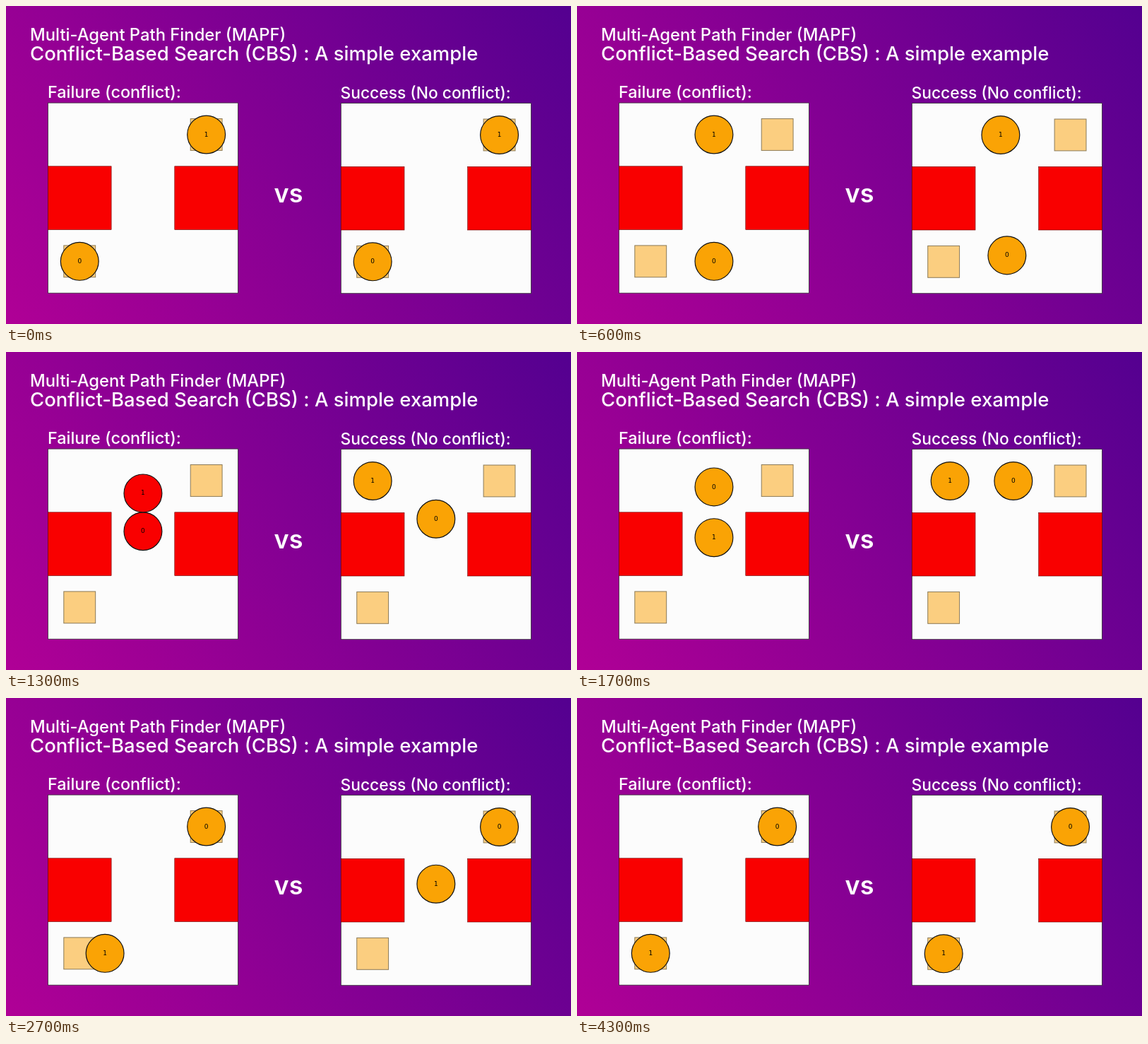
Animation of 800 by 450 pixels, one loop 4.4 s. Source, as an HTML page:

```html
<!DOCTYPE html>
<html lang="en">
<head>
<meta charset="utf-8">
<title>Conflict-Based Search</title>
<style>
  html, body { margin: 0; width: 100%; height: 100%; overflow: hidden; }
  body { background: linear-gradient(57deg, #b00096, #540090); }
  svg { display: block; width: 800px; height: 450px; }
  text { font-family: Inter, sans-serif; font-weight: 500; fill: #fff; }
  .board { fill: #fcfcfc; stroke: #333; stroke-width: .8; }
  .wall { fill: #f90000; stroke: #600; stroke-width: .6; }
  .goal { fill: #fbce80; stroke: #8a7a58; stroke-width: 1; }
  .agent { fill: #faa305; stroke: #111; stroke-width: 1.2; }
  .agent.hit { fill: #f90000; }
  .id { font: 9px "DejaVu Sans", sans-serif; fill: #000; text-anchor: middle; }
</style>
</head>
<body>
<svg id="stage" viewBox="0 0 800 450">
  <text x="34" y="49" font-size="23.8">Multi-Agent Path Finder (MAPF)</text>
  <text x="34" y="77" font-size="27.5">Conflict-Based Search (CBS) : A simple example</text>
  <text x="59" y="130" font-size="23.4">Failure (conflict):</text>
  <text x="473.5" y="130.5" font-size="22.8">Success (No conflict):</text>
  <text x="400" y="278" font-size="36" style="font-weight: 600" text-anchor="middle">vs</text>
</svg>
<script>
const LOOP = 4400, FRAME = 100, CELL = 89.7;
const stage = document.getElementById('stage');

function add(parent, tag, attrs) {
  const node = document.createElementNS(stage.namespaceURI, tag);
  for (const key in attrs) node.setAttribute(key, attrs[key]);
  return parent.appendChild(node);
}

// One grid cell per time unit, written as "column row" pairs.
const parsePath = text => text.split(' ').map(cell => [...cell].map(Number));

function positionAt(path, time) {
  const last = path.length - 1;
  const i = Math.min(Math.floor(time), last);
  const from = path[i], to = path[Math.min(i + 1, last)];
  return from.map((v, axis) => (v + (to[axis] - v) * (time - i)) * CELL);
}

function createBoard({ x, y, paths, tick }) {
  const board = add(stage, 'g', { transform: `translate(${x} ${y})` });
  const square = (cls, col, row, size) => add(board, 'rect', {
    class: cls, width: size, height: size,
    x: (col + .5) * CELL - size / 2, y: (row + .5) * CELL - size / 2
  });
  square('board', 1, 1, CELL * 3);
  square('goal', 2, 0, CELL / 2);
  square('goal', 0, 2, CELL / 2);
  square('wall', 0, 1, CELL);
  square('wall', 2, 1, CELL);

  const center = add(board, 'g', { transform: `translate(${CELL / 2} ${CELL / 2})` });
  const discs = paths.map(() => add(center, 'circle', { class: 'agent', r: CELL * .3 }));
  const labels = paths.map((_, i) => {
    const label = add(center, 'text', { class: 'id', y: 2.6 });
    label.textContent = i;
    return label;
  });
  const routes = paths.map(parsePath);

  return frame => {
    const time = tick(frame) / 10;
    const spots = routes.map(route => positionAt(route, time));
    const [a, b] = spots;
    const hit = Math.hypot(a[0] - b[0], a[1] - b[1]) < .7 * CELL;
    spots.forEach((spot, i) => {
      const move = `translate(${spot})`;
      discs[i].setAttribute('transform', move);
      discs[i].classList.toggle('hit', hit);
      labels[i].setAttribute('transform', move);
    });
  };
}

const boards = [
  { x: 59.4, y: 137.1, tick: n => Math.floor(n * 1.72),
    paths: ['02 12 11 10 20', '20 10 10 11 12 02'] },
  { x: 474.3, y: 137.6, tick: n => Math.ceil(n * 1.79),
    paths: ['02 12 11 10 20', '20 10 00 00 10 11 12 02'] }
].map(createBoard);

const start = performance.now();
function draw() {
  const frame = Math.floor((performance.now() - start) % LOOP / FRAME);
  boards.forEach(update => update(frame));
  requestAnimationFrame(draw);
}
draw();
</script>
</body>
</html>
```
